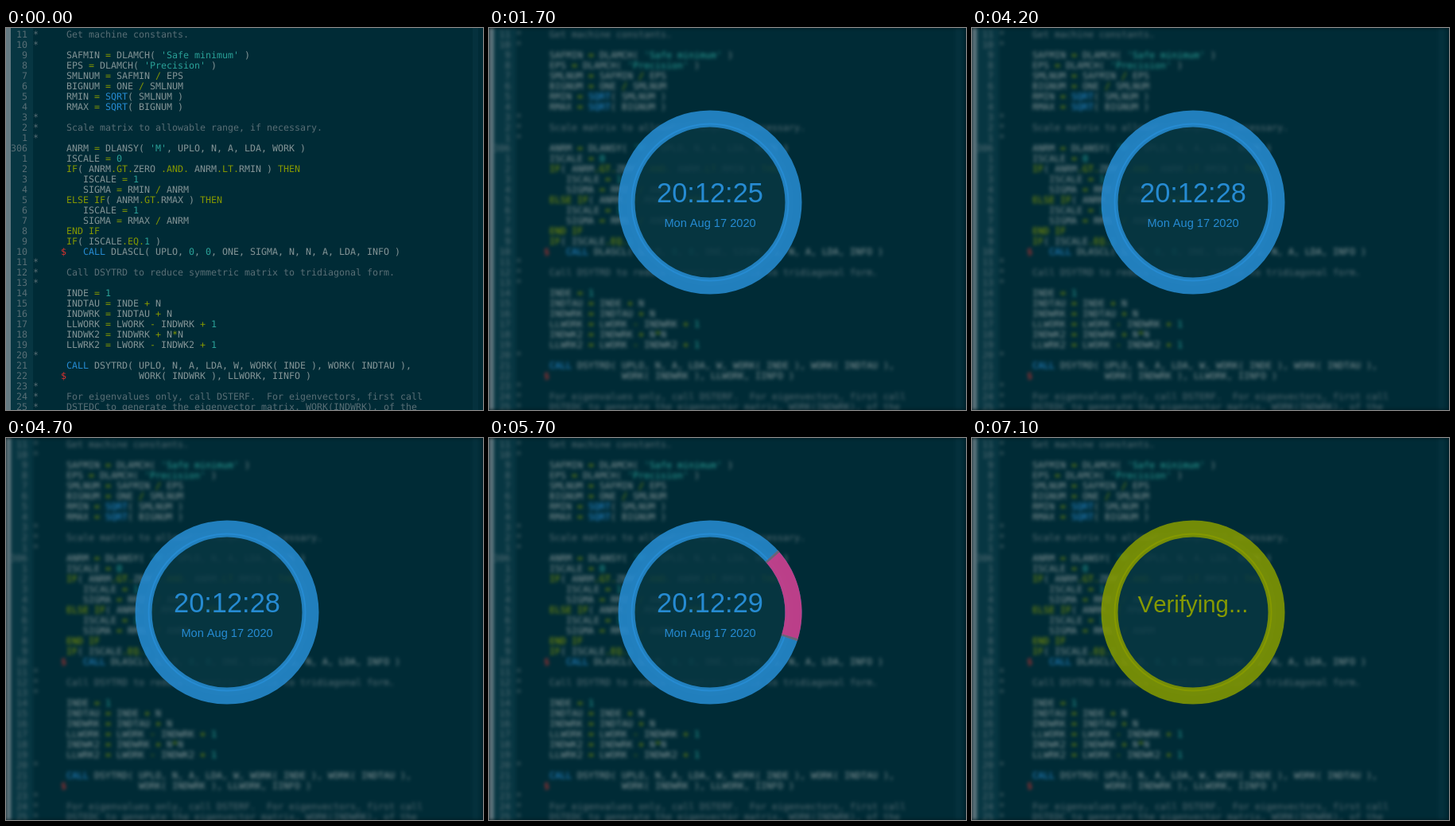
Write an HTML page that moves like this. It is 600 px wide and 480 px high and loops after 8000 ms.

```html
<!DOCTYPE html>
<html lang="en">
<head>
<meta charset="utf-8">
<title>Lock screen</title>
<style>
  html, body { margin: 0; width: 100%; height: 100%; overflow: hidden; background: #00161c; }
  svg { display: block; width: 600px; height: 480px; }
  .code text { font: 11.63px "DejaVu Sans Mono", monospace; white-space: pre; text-rendering: geometricPrecision; }
  .label text { font-family: "Liberation Sans", Arial, sans-serif; text-anchor: middle; font-kerning: none; }
</style>
</head>
<body>
<svg viewBox="0 0 600 480">
  <defs>
    <filter id="blur" filterUnits="userSpaceOnUse" x="0" y="0" width="600" height="480" color-interpolation-filters="sRGB">
      <feGaussianBlur stdDeviation="2"/>
    </filter>
  </defs>
  <g id="editor" class="code">
    <rect width="600" height="480" fill="#002b36"/>
    <rect width="6" height="480" fill="#657b83"/>
    <rect x="6" width="28" height="480" fill="#073642"/>
    <rect x="587" width="7" height="480" fill="#05313d"/>
  </g>
  <g id="lock" class="label">
    <circle cx="278" cy="219" r="105" fill="#073642" fill-opacity=".87"/>
    <circle id="ring" cx="278" cy="219" r="105" fill="none" stroke-width="21" stroke-opacity=".87"/>
    <circle id="line" cx="278" cy="219" r="98.5" fill="none" stroke-width="2"/>
    <g id="key" fill="none" stroke-width="21" stroke-opacity=".87">
      <path id="arc" stroke="#d33682"/>
      <path id="edges" stroke="#586e75"/>
    </g>
    <g id="clock" fill="#268bd2">
      <text id="time" x="278" y="219" font-size="34.4"></text>
      <text x="278" y="250" font-size="14.6">Mon Aug 17 2020</text>
    </g>
    <text id="verify" x="278" y="219" font-size="29.4" fill="#859900">Verifying...</text>
  </g>
  <rect id="flash" width="600" height="480" fill="#fefefe"/>
</svg>
<script>
const LOOP = 8000, FLASH = 1500, LOCKED = 1700, VERIFY = 7100;
const TICKS = [2100, 3100, 4200, 5100, 6100];
// Key presses: [on, off, start angle in degrees]
const KEYS = [
  [3500, 3800, -5], [3900, 4200, -40], [4400, 4700, 118], [4900, 5200, 181.4],
  [5300, 5500, -17], [5700, 5900, -42.3], [6100, 6200, 106], [6500, 6800, 232]
];
const SPAN = 60.4, EDGE = 1.4;

const SOURCE = `*     Get machine constants.
*
      SAFMIN = DLAMCH( 'Safe minimum' )
      EPS = DLAMCH( 'Precision' )
      SMLNUM = SAFMIN / EPS
      BIGNUM = ONE / SMLNUM
      RMIN = SQRT( SMLNUM )
      RMAX = SQRT( BIGNUM )
*
*     Scale matrix to allowable range, if necessary.
*
      ANRM = DLANSY( 'M', UPLO, N, A, LDA, WORK )
      ISCALE = 0
      IF( ANRM.GT.ZERO .AND. ANRM.LT.RMIN ) THEN
         ISCALE = 1
         SIGMA = RMIN / ANRM
      ELSE IF( ANRM.GT.RMAX ) THEN
         ISCALE = 1
         SIGMA = RMAX / ANRM
      END IF
      IF( ISCALE.EQ.1 )
     $   CALL DLASCL( UPLO, 0, 0, ONE, SIGMA, N, N, A, LDA, INFO )
*
*     Call DSYTRD to reduce symmetric matrix to tridiagonal form.
*
      INDE = 1
      INDTAU = INDE + N
      INDWRK = INDTAU + N
      LLWORK = LWORK - INDWRK + 1
      INDWK2 = INDWRK + N*N
      LLWRK2 = LWORK - INDWK2 + 1
*
      CALL DSYTRD( UPLO, N, A, LDA, W, WORK( INDE ), WORK( INDTAU ),
     $             WORK( INDWRK ), LLWORK, IINFO )
*
*     For eigenvalues only, call DSTERF.  For eigenvectors, first call
*     DSTEDC to generate the eigenvector matrix, WORK(INDWRK), of the`;

const $ = id => document.getElementById(id);
const COMMENT = '#586e75';
const TOKEN = /'[^']*'|\.[A-Z]+\.|[A-Z]\w*|\d+|[=\/+*-]|\$|[(),]+/g;

function addText(parent, x, y, fill, content, anchor = 'start') {
  const node = document.createElementNS('http://www.w3.org/2000/svg', 'text');
  Object.entries({ x, y, fill, 'text-anchor': anchor }).forEach(([k, v]) => node.setAttribute(k, v));
  node.textContent = content;
  parent.append(node);
}

function tokenColor(token) {
  if (/^['\d]/.test(token)) return '#2aa198';
  if (/^(CALL|SQRT)$/.test(token)) return '#268bd2';
  if (/^(IF|THEN|ELSE|END|\..*|[=\/+*-])$/.test(token)) return '#859900';
  return token === '$' ? '#dc322f' : '#839496';
}

function buildEditor() {
  const editor = $('editor'), cursorRow = 11;
  SOURCE.split('\n').forEach((line, row) => {
    const y = 12 + row * 13;
    addText(editor, 27, y, COMMENT, Math.abs(row - cursorRow) || 306, 'end');
    if (line[0] === '*') return addText(editor, 34, y, COMMENT, line);
    for (const match of line.matchAll(TOKEN))
      addText(editor, 34 + match.index * 7, y, tokenColor(match[0]), match[0]);
  });
}

function arcPath(from, to) {
  const point = deg => {
    const a = deg * Math.PI / 180;
    return `${278 + 105 * Math.cos(a)} ${219 + 105 * Math.sin(a)}`;
  };
  return `M${point(from)}A105 105 0 0 1 ${point(to)}`;
}

const show = (id, on) => $(id).setAttribute('display', on ? 'inline' : 'none');

function draw(t) {
  const locked = t >= LOCKED, verifying = t >= VERIFY;
  show('flash', t >= FLASH && !locked);
  show('lock', locked);
  show('clock', !verifying);
  show('verify', verifying);
  $('editor').setAttribute('filter', locked ? 'url(#blur)' : 'none');

  const color = verifying ? '#859900' : '#268bd2';
  $('ring').setAttribute('stroke', color);
  $('line').setAttribute('stroke', color);
  $('time').textContent = '20:12:' + (25 + TICKS.filter(tick => t >= tick).length);

  const key = KEYS.find(([on, off]) => t >= on && t < off);
  show('key', key);
  if (key) {
    const start = key[2], end = start + SPAN;
    $('arc').setAttribute('d', arcPath(start, end));
    $('edges').setAttribute('d', arcPath(start, start + EDGE) + arcPath(end - EDGE, end));
  }
}

buildEditor();
const began = performance.now();
function frame() {
  draw((performance.now() - began) % LOOP);
  requestAnimationFrame(frame);
}
frame();
</script>
</body>
</html>
```
